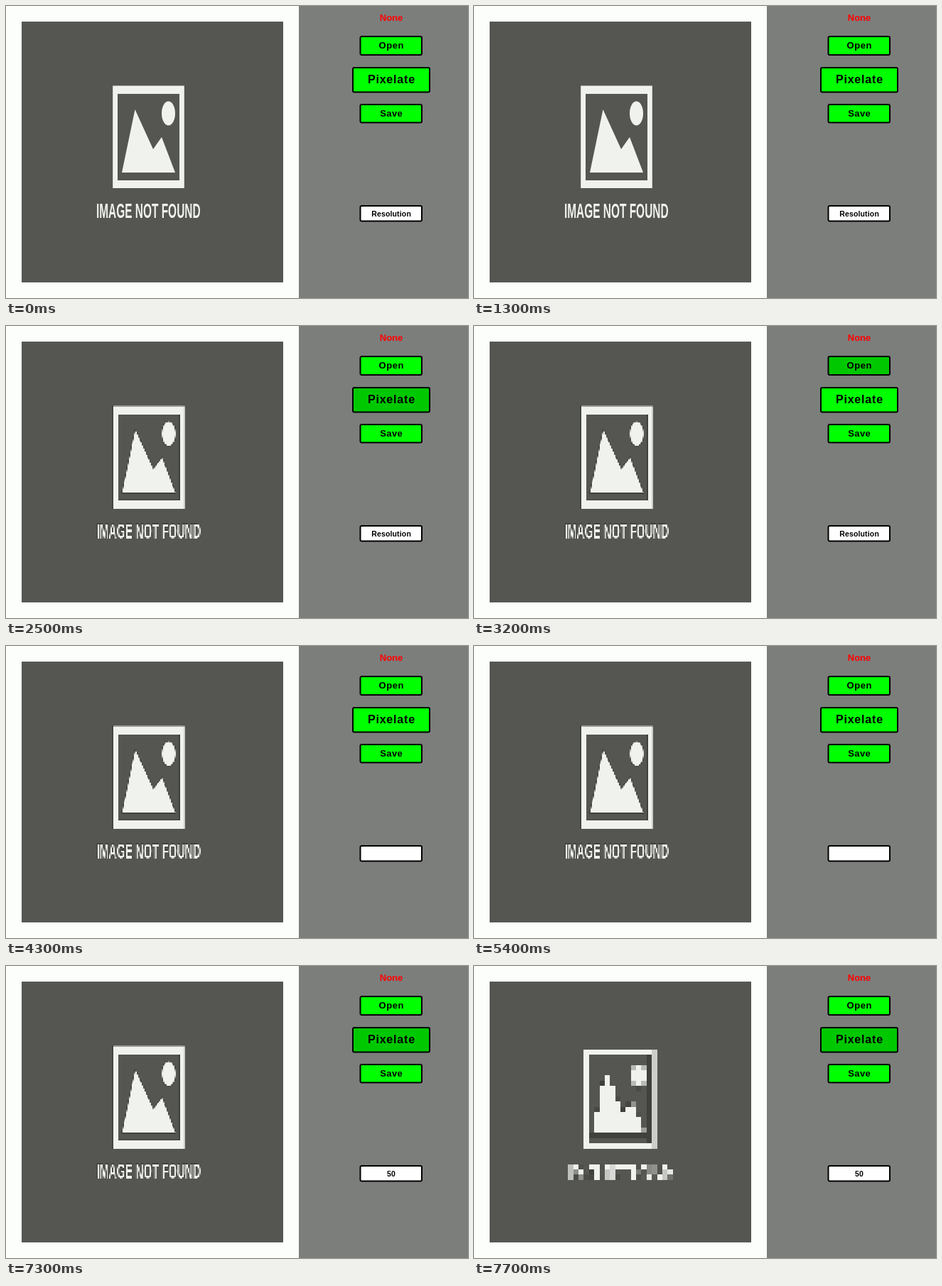
Animation of 650x412 px, one loop 8 s. Source, as an HTML page with a canvas:

```html
<!DOCTYPE html>
<html>
<head>
<meta charset="utf-8">
<style>
  html, body { margin: 0; height: 100%; overflow: hidden; background: #fcfefc; }
  canvas { display: block; }
</style>
</head>
<body>
<canvas id="stage" width="650" height="412"></canvas>
<script>
const LOOP = 8000, SIZE = 368, MARGIN = 22;
const FONT = '"Liberation Sans", Arial, sans-serif';
const DARK = '#555652', LIGHT = '#f0f2ee', EDGE = '#40413d';
const GREEN = '#00ff00', HOVER = '#00c800';
const ctx = document.getElementById('stage').getContext('2d');

function makeCanvas(size) {
  const canvas = document.createElement('canvas');
  canvas.width = canvas.height = size;
  const g = canvas.getContext('2d');
  g.fillStyle = DARK;
  g.fillRect(0, 0, size, size);
  return [canvas, g];
}

// The placeholder picture; resampling works from a version with dark edges.
function drawPlaceholder(edges) {
  const [canvas, g] = makeCanvas(SIZE);
  g.translate(-MARGIN, -MARGIN);

  const frame = new Path2D();
  frame.rect(150.2, 112.6, 100.6, 144.4);
  frame.rect(157, 124, 87, 122);
  const mountains = new Path2D('M163 235L181.5 146L207 202L219 185L238 235Z');
  const sun = new Path2D();
  sun.ellipse(228.5, 151.5, 9.5, 17, 0, 0, 7);

  g.fillStyle = LIGHT;
  g.strokeStyle = EDGE;
  g.lineWidth = 2;
  for (const shape of [frame, mountains, sun]) {
    if (edges) g.stroke(shape);
    g.fill(shape, 'evenodd');
  }

  // The picture is wide artwork squeezed into a square.
  g.translate(126.9, 299.3);
  g.scale(0.54, 1);
  g.font = `bold 28.6px ${FONT}`;
  if (edges) g.strokeText('IMAGE NOT FOUND', 0, 0);
  g.fillText('IMAGE NOT FOUND', 0, 0);
  return canvas;
}

// Nearest-neighbour sampling at the top left pixel of each cell.
function pixelate(source, cells) {
  const [canvas, g] = makeCanvas(cells);
  const shift = 0.5 - 0.5 * cells / SIZE;
  g.imageSmoothingEnabled = false;
  g.drawImage(source, shift, shift, cells, cells);
  return canvas;
}

const original = drawPlaceholder(false);
const edged = drawPlaceholder(true);
const fine = pixelate(edged, 200);
const coarse = pixelate(edged, 50);

function label(text, y, size, color = '#000', spacing = 0) {
  ctx.font = `bold ${size}px ${FONT}`;
  ctx.letterSpacing = spacing + 'px';
  ctx.textAlign = 'center';
  ctx.fillStyle = color;
  ctx.fillText(text, 542 + spacing / 2, y);
}

function box(x, y, w, h, fill) {
  ctx.beginPath();
  ctx.roundRect(x, y, w, h, 2);
  ctx.fillStyle = fill;
  ctx.fill();
  ctx.strokeStyle = '#000';
  ctx.lineWidth = 2;
  ctx.stroke();
}

function draw(t) {
  const within = (from, to) => t >= from && t < to;

  ctx.fillStyle = '#fcfefc';
  ctx.fillRect(0, 0, 412, 412);
  ctx.fillStyle = '#7c7e7b';
  ctx.fillRect(412, 0, 238, 412);

  const picture = t < 2100 ? original : t < 7500 ? fine : coarse;
  ctx.imageSmoothingEnabled = false;
  ctx.drawImage(picture, MARGIN, MARGIN, SIZE, SIZE);

  const pixelateHover = within(1500, 3200) || t >= 7200;
  box(498.5, 43, 86.5, 26, within(3200, 3700) ? HOVER : GREEN);
  box(488, 87, 108, 34.5, pixelateHover ? HOVER : GREEN);
  box(498.5, 139, 86.5, 25.5, GREEN);
  box(498.5, 282, 86.5, 21.5, '#fff');

  label('None', 21, 13, '#f00');
  label('Open', 60, 13, '#000', 0.6);
  label('Pixelate', 109, 16, '#000', 0.8);
  label('Save', 156, 13, '#000', 0.4);

  const entry = t < 4300 ? 'Resolution' : t < 5800 ? '' : t < 5900 ? '5' : '50';
  label(entry, 296.5, 10.5, '#000', 0.15);
  if (within(4800, 5400) || within(6700, 7200)) {
    ctx.fillStyle = '#000';
    ctx.fillRect(entry ? 547 : 541, 287, 1, 11);
  }
}

function tick() {
  draw(performance.now() % LOOP);
  requestAnimationFrame(tick);
}
tick();
</script>
</body>
</html>
```
